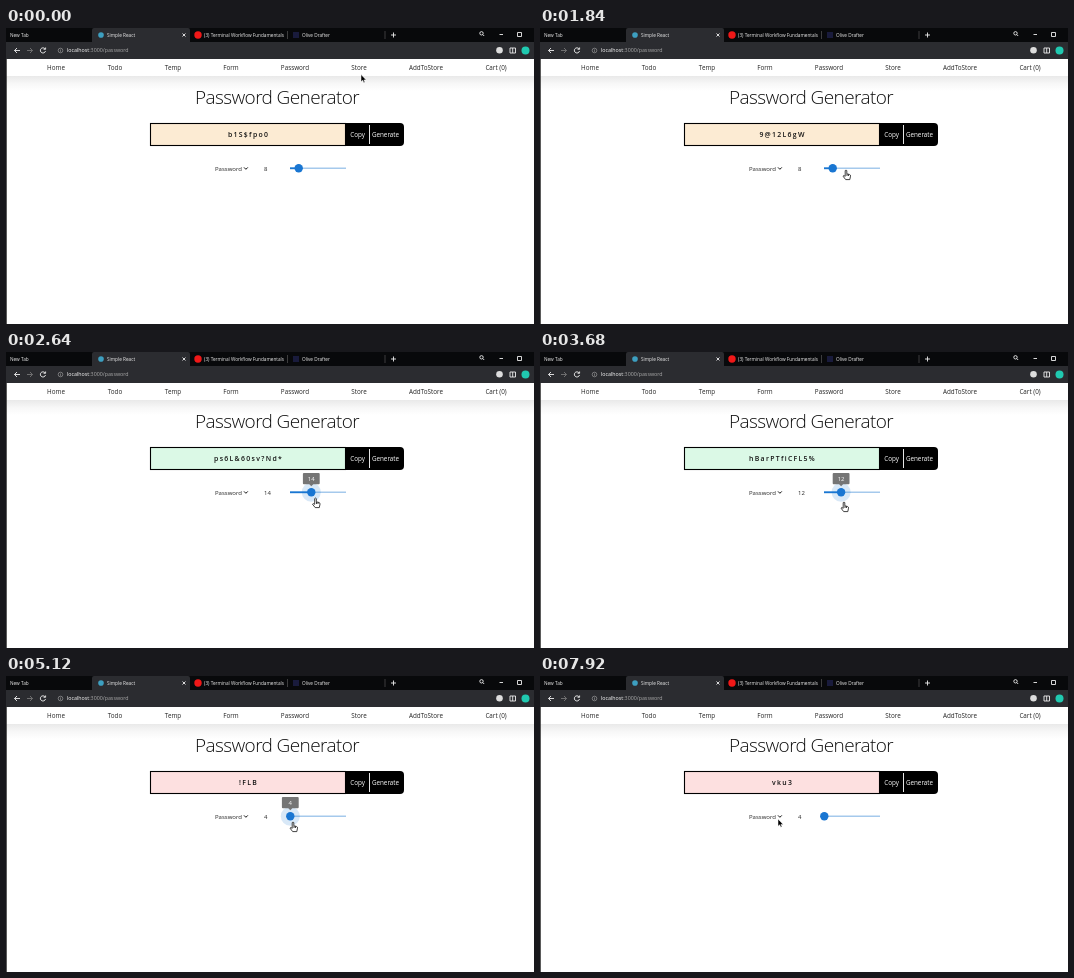
An HTML page that plays this animation: 528x296 px, repeating every 8 s.

```html
<!DOCTYPE html>
<html lang="en">
<head>
<meta charset="utf-8">
<title>Password Generator</title>
<style>
  html, body { margin: 0; height: 100%; overflow: hidden; background: #fff; }
  svg { display: block; width: 528px; height: 296px; font: 6.3px "Open Sans", "Noto Sans", sans-serif; }
  .tab { font-size: 4.7px; fill: #eee; }
  .mid { text-anchor: middle; }
  .line { fill: none; stroke: #eee; stroke-width: .9; }
  #title { font-size: 19px; font-weight: 300; letter-spacing: -.6px; }
  #pass { font-size: 6.9px; font-weight: 600; letter-spacing: 1.3px; }
</style>
</head>
<body>
<svg viewBox="0 0 528 296">
  <defs>
    <linearGradient id="shade" x2="0" y2="1">
      <stop stop-color="#e9e9e9"/><stop offset=".5" stop-color="#f7f7f7"/><stop offset="1" stop-color="#fff"/>
    </linearGradient>
  </defs>

  <!-- browser bar -->
  <path fill="#08090b" d="M0 0H528V14H0Z"/>
  <path fill="#2b2c30" d="M0 14H528V31H0ZM86 14V2q0-2 2-2H182q2 0 2 2V14Z"/>
  <g class="tab">
    <text x="4" y="8.7">New Tab</text>
    <text x="101" y="8.7">Simple React</text>
    <text x="198" y="8.7">(3) Terminal Workflow Fundamentals</text>
    <text x="296" y="8.7">Olive Drafter</text>
  </g>
  <circle cx="95" cy="7" r="2.8" fill="#3d9fc0"/>
  <circle cx="192" cy="7" r="3.7" fill="#f01818"/>
  <rect x="287" y="4" width="6" height="6" fill="#191b3c"/>
  <path stroke="#555" stroke-width=".7" d="M281.500 3V11M379 3V11"/>
  <g class="line">
    <path d="M176.500 5.500l3 3m0-3l-3 3M385 7h5M387.500 4.500v5M493.500 6.500h3.500M511.500 4.500h4v4h-4Z"/>
    <circle cx="475.500" cy="5.300" r="1.700"/><path d="M476.700 6.500l1.500 1.500"/>
    <path d="M14 22.500H8.500M11 20l-2.500 2.500 2.500 2.500"/>
    <path stroke="#777" d="M21 22.500h5.500M24 20l2.500 2.500-2.500 2.500"/>
    <path d="M39 20.800a2.600 2.600 0 1 0 .5 2.200M39.600 19.500v1.800h-2"/>
    <circle cx="54.500" cy="22.500" r="2.300" stroke="#aaa" stroke-width=".6"/>
    <path stroke="#aaa" stroke-width=".6" d="M54.500 21v.5m0 .6v1.700"/>
    <path d="M504 20h5.500v5H504ZM506.700 20v5"/>
  </g>
  <circle cx="493.500" cy="22.300" r="3.300" fill="#ddd"/>
  <circle cx="519.500" cy="22.500" r="4" fill="#20c9b0"/>
  <text x="61" y="24.400" font-size="5.300" fill="#aaa"><tspan fill="#fff">localhost</tspan>:3000/password</text>

  <!-- page -->
  <rect y="48" width="528" height="15" fill="url(#shade)"/>
  <rect y="31" width=".8" height="265" fill="#333"/>
  <g id="nav" class="mid" fill="#222"></g>
  <text id="title" class="mid" x="271" y="75.500" fill="#111">Password Generator</text>
  <path d="M339 95H394q4 0 4 4V114q0 4-4 4H339Z"/>
  <rect id="field" x="144.500" y="95.500" width="195" height="22" stroke="#000" stroke-width="1.100"/>
  <path stroke="#fff" stroke-width=".9" d="M363.500 97V116"/>
  <text id="pass" class="mid" x="242.600" y="109.400" fill="#111"></text>
  <g class="mid" fill="#fff"><text x="351.700" y="109">Copy</text><text x="379.500" y="109">Generate</text></g>
  <g font-size="6" fill="#222">
    <text x="209" y="143">Password</text>
    <text id="size" x="258" y="143"></text>
  </g>
  <path fill="none" stroke="#111" d="M238 139.400l1.900 1.900 1.900-1.900"/>

  <!-- slider -->
  <path stroke="#a5c9ec" stroke-width="1.600" d="M284 140.300H340"/>
  <path id="fill" stroke="#1976d2" stroke-width="1.800"/>
  <g id="thumb">
    <circle id="halo" r="9.500" fill="#1976d2" opacity=".17"/>
    <circle r="4.200" fill="#1976d2"/>
    <g id="tip">
      <path fill="#757575" d="M-7.400-19.300H7.400q1 0 1 1V-9q0 1-1 1H2L0-6-2-8H-7.400q-1 0-1-1V-18.300q0-1 1-1Z"/>
      <text id="tipText" class="mid" y="-11.500" font-size="6" fill="#fff"></text>
    </g>
  </g>

  <g id="cursor" stroke-linejoin="round">
    <path id="arrow" stroke="#fff" stroke-width=".5" d="M0 0V7.300L1.700 5.800 2.800 8.300 4 7.800 2.900 5.400H5.200Z"/>
    <path id="hand" fill="#fff" stroke="#111" stroke-width=".8"
      d="M-.8.600Q0-.500.800.600V3.800L3.600 4.500Q4.700 4.900 4.500 6.200L3.800 9.600H-.300L-3 6.200Q-2.400 4.900-.800 6.300ZM1 6V4M2.500 6V4.300"/>
  </g>
</svg>
<script>
const $ = id => document.getElementById(id);
const LOOP = 8000, STEP = 80;
const PRESS = 1920, RELEASE = 5760;

$("nav").innerHTML = Object.entries({
  Home: 50, Todo: 109, Temp: 167, Form: 225, Password: 289, Store: 353, AddToStore: 420, "Cart (0)": 490
}).map(([label, x]) => `<text x="${x}" y="42">${label}</text>`).join("");

// time, slider value, password
const states = [
  [0, 8, "b1S$fpo0"], [800, 8, "Rk4?wN2x"], [1040, 8, "9@12L6gW"],
  [1920, 12, "tY7&mq2LdX"], [2160, 13, "w8Hs!Kc3pZr5"], [2480, 14, "ps6L&60sv?Nd*"],
  [2800, 15, "Gf3$xQ9mLa7!uT"], [2960, 16, "e5Wn?r8KzP2&hYd"], [3200, 14, "Vb7*qJ4sMx!c6T"],
  [3440, 13, "y2Lg@R9fHk5wN"], [3520, 12, "hBarPTfiCFL5%"], [3840, 11, "Q4u!nZ8rDe?x"],
  [4000, 10, "m7Kp$2WsTa"], [4160, 9, "c9F&vX3hLo"], [4320, 8, "J6r?eN1q"],
  [4480, 6, "Z*4tjdh"], [4640, 5, "k8W!p"], [4800, 4, "!FLB"],
  [6560, 4, "r5&T"], [6720, 4, "Xq2m"], [6880, 4, "vku3"]
];

// time, pointer x, pointer y
const path = [
  [0, 355, 46.5], [560, 376, 102], [800, 380, 109], [1200, 380, 111], [1680, 307, 142],
  [1840, 306, 142], [2160, 307, 144], [2640, 309.5, 146], [2960, 312, 147], [3520, 304, 148],
  [3680, 304, 150], [4320, 296, 150.5], [4480, 291, 150], [4800, 287, 149], [5120, 287, 146],
  [5680, 287, 146], [6160, 380, 112], [6880, 380, 112], [7080, 300, 164], [7280, 240, 145],
  [7440, 238, 143], [8000, 238, 143]
];

function pointer(t) {
  const i = path.findIndex((p, n) => n && t <= p[0]);
  const [t0, x0, y0] = path[i - 1], [t1, x1, y1] = path[i];
  const u = (t - t0) / (t1 - t0), k = u * u * (3 - 2 * u);
  return [x0 + (x1 - x0) * k, y0 + (y1 - y0) * k];
}

function draw(now) {
  const t = Math.floor(now % LOOP / STEP) * STEP;
  const [, value, password] = states.findLast(s => s[0] <= t);
  const knob = 284.3 + 2.1 * (value - 4);
  const [x, y] = pointer(t);
  const held = t >= PRESS && t < RELEASE;
  const onButton = x > 339 && x < 398 && y > 95 && y < 118;
  const onSlider = x > 280 && x < 344 && Math.abs(y - 140) < 7;

  $("pass").textContent = password;
  $("field").setAttribute("fill", value > 10 ? "#dbf9e6" : value > 5 ? "#fcebd3" : "#fde0e0");
  $("size").textContent = $("tipText").textContent = value;
  $("fill").setAttribute("d", `M284 140.3H${knob}`);
  $("thumb").setAttribute("transform", `translate(${knob} 140.3)`);
  $("halo").style.display = held ? "" : "none";
  $("tip").setAttribute("transform", `scale(${held ? Math.min(1, (t - PRESS + STEP) / 200) : 0})`);

  const hand = held || onButton || onSlider;
  $("hand").style.display = hand ? "" : "none";
  $("arrow").style.display = hand ? "none" : "";
  $("cursor").setAttribute("transform", `translate(${x} ${y})`);
  requestAnimationFrame(draw);
}
requestAnimationFrame(draw);
</script>
</body>
</html>
```
